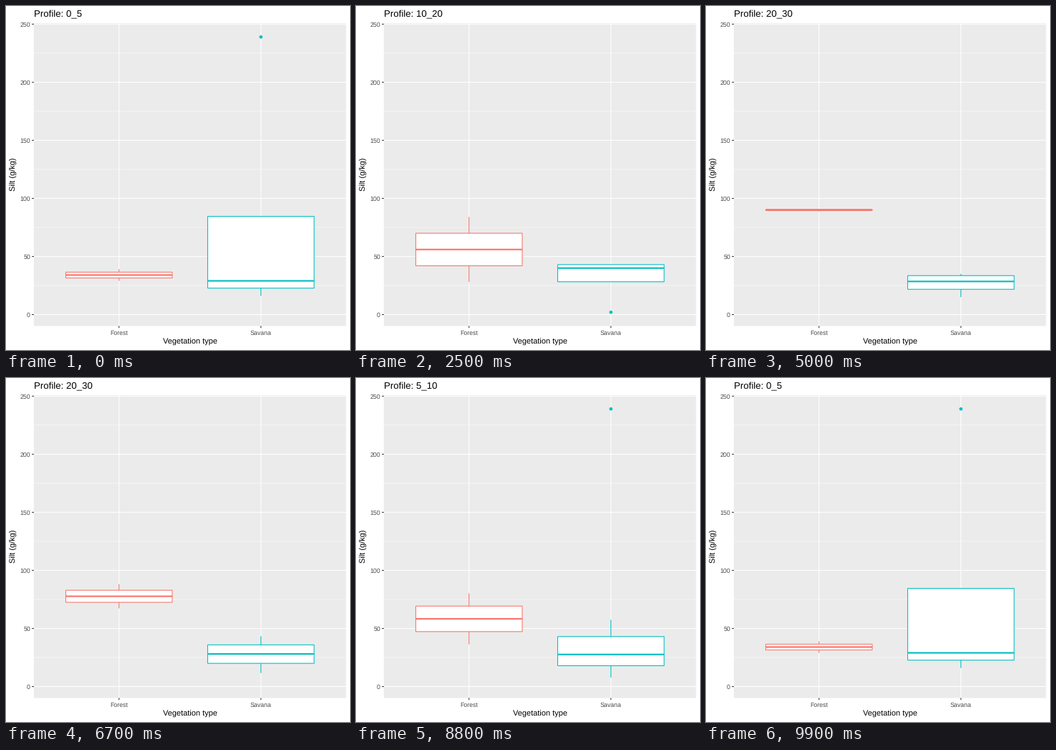
Animation, 480 px wide and 480 px high, one loop 10 s. Source, as a matplotlib script:

```python
import matplotlib.pyplot as plt
import numpy as np
from matplotlib.animation import FuncAnimation
from matplotlib.patches import Circle, Rectangle

SIZE, DPI = 480, 72  # at 72 dpi one point is one pixel
LEFT, RIGHT, TOP, BOTTOM = 38.9, 474.5, 23.95, 446.5
Y_MIN, Y_MAX = -9.85, 250.85
LINE = 1.07

plt.rcParams["font.family"] = "Liberation Sans"
plt.rcParams["text.hinting"] = "none"

GROUPS = [("Forest", "#F8766D"), ("Savana", "#00BFC4")]
# Silt samples per depth profile: forest, savana
STATES = [
    ("0_5", (29, 39), (16, 25, 33, 239)),
    ("10_20", (28, 84), (2, 37, 43, 43)),
    ("20_30", (89, 91), (15, 24, 33, 35)),
    ("5_10", (37, 84), (7, 21, 34, 55)),
]
# Last still frame before each transition and the frame where it lands
MOVES = [(12, 25), (38, 50), (62, 74), (87, 99)]


def px(x):
    return LEFT + (x - 0.4) / 2.2 * (RIGHT - LEFT)


def py(y):
    return BOTTOM - (np.asarray(y) - Y_MIN) / (Y_MAX - Y_MIN) * (BOTTOM - TOP)


def summarise(values):
    """Five box-plot numbers and the outlier, if there is one."""
    v = np.array(values, float)
    q1, q2, q3 = np.percentile(v, [25, 50, 75])
    reach = 1.5 * (q3 - q1)
    out = (v < q1 - reach) | (v > q3 + reach)
    kept = np.append(v[~out], [q1, q3])
    outlier = v[out][0] if out.any() else None
    return np.array([kept.min(), q1, q2, q3, kept.max()]), outlier


STATS = [[summarise(s) for s in state[1:]] for state in STATES]


def locate(frame):
    """Previous state, next state, progress and title for a frame."""
    for i, (start, end) in enumerate(MOVES):
        nxt = (i + 1) % len(STATES)
        if frame < end:
            step, steps = max(frame - start, 0), end - start
            near = i if step <= (steps + 1) // 2 else nxt
            return i, nxt, step / steps, STATES[near][0]
    return 0, 0, 0, STATES[0][0]


def tween_outlier(a, b, t):
    if t == 0 or b is None:
        return a
    return b if a is None else a + (b - a) * t


fig = plt.figure(figsize=(SIZE / DPI, SIZE / DPI), dpi=DPI, facecolor="white")
ax = fig.add_axes([0, 0, 1, 1])
ax.set_xlim(0, SIZE)
ax.set_ylim(SIZE, 0)
ax.axis("off")


def line(xs, ys, color, width=LINE, z=2):
    return ax.plot(xs, ys, color=color, lw=width, zorder=z,
                   solid_capstyle="butt", snap=False)[0]


def label(x, y, s, size, color="black", **kw):
    return ax.text(x, y, s, fontsize=size, color=color, **kw)


def draw_panel():
    ax.add_patch(Rectangle((LEFT, TOP), RIGHT - LEFT, BOTTOM - TOP,
                           fc="#EBEBEB", ec="none", snap=False, zorder=0))
    for v in range(25, 250, 50):
        line([LEFT, RIGHT], [py(v)] * 2, "white", LINE / 2, 1)
    for v in range(0, 251, 50):
        y = py(v)
        line([LEFT, RIGHT], [y, y], "white")
        line([LEFT - 2.74, LEFT], [y, y], "#333333")
        label(LEFT - 4.94, y + 3.15, str(v), 8.8, "#4D4D4D", ha="right")
    for i, (name, _) in enumerate(GROUPS, 1):
        x = px(i)
        line([x, x], [TOP, BOTTOM], "white")
        line([x, x], [BOTTOM, BOTTOM + 2.74], "#333333")
        label(x, 459, name, 8.8, "#4D4D4D", ha="center")
    label((LEFT + RIGHT) / 2, 472, "Vegetation type", 11, ha="center")
    label(13.3, (TOP + BOTTOM) / 2, "Silt (g/kg)", 11, rotation=90,
          ha="right", va="center", rotation_mode="default").set(
              ha="center", va="baseline", rotation_mode="anchor")


class Box:
    def __init__(self, pos, color):
        self.x = px(pos)
        self.x0, self.x1 = px(pos - 0.375), px(pos + 0.375)
        self.dot = ax.add_patch(Circle((self.x, 0), 2.3, fc=color, ec="none",
                                       zorder=3))
        self.low = line([], [], color, z=4)
        self.high = line([], [], color, z=4)
        self.body = ax.add_patch(Rectangle(
            (self.x0, 0), self.x1 - self.x0, 1, fc="white", ec=color,
            lw=LINE, joinstyle="miter", snap=False, zorder=5))
        self.median = line([], [], color, 2 * LINE, 6)

    def set(self, stats, outlier):
        lo, q1, q2, q3, hi = py(stats)
        self.low.set_data([self.x] * 2, [q1, lo])
        self.high.set_data([self.x] * 2, [q3, hi])
        self.body.set_y(q3)
        self.body.set_height(q1 - q3)
        self.median.set_data([self.x0, self.x1], [q2, q2])
        self.dot.set_visible(outlier is not None)
        if outlier is not None:
            self.dot.center = self.x, py(outlier)


draw_panel()
title = label(LEFT, 15, "", 13.2)
boxes = [Box(i, color) for i, (_, color) in enumerate(GROUPS, 1)]


def update(frame):
    prev, nxt, t, name = locate(frame)
    title.set_text(f"Profile: {name}")
    for box, (a, out_a), (b, out_b) in zip(boxes, STATS[prev], STATS[nxt]):
        box.set(a + (b - a) * t, tween_outlier(out_a, out_b, t))
    return []


anim = FuncAnimation(fig, update, frames=100, interval=100, repeat=True,
                     repeat_delay=0, blit=False)
plt.show()
```
